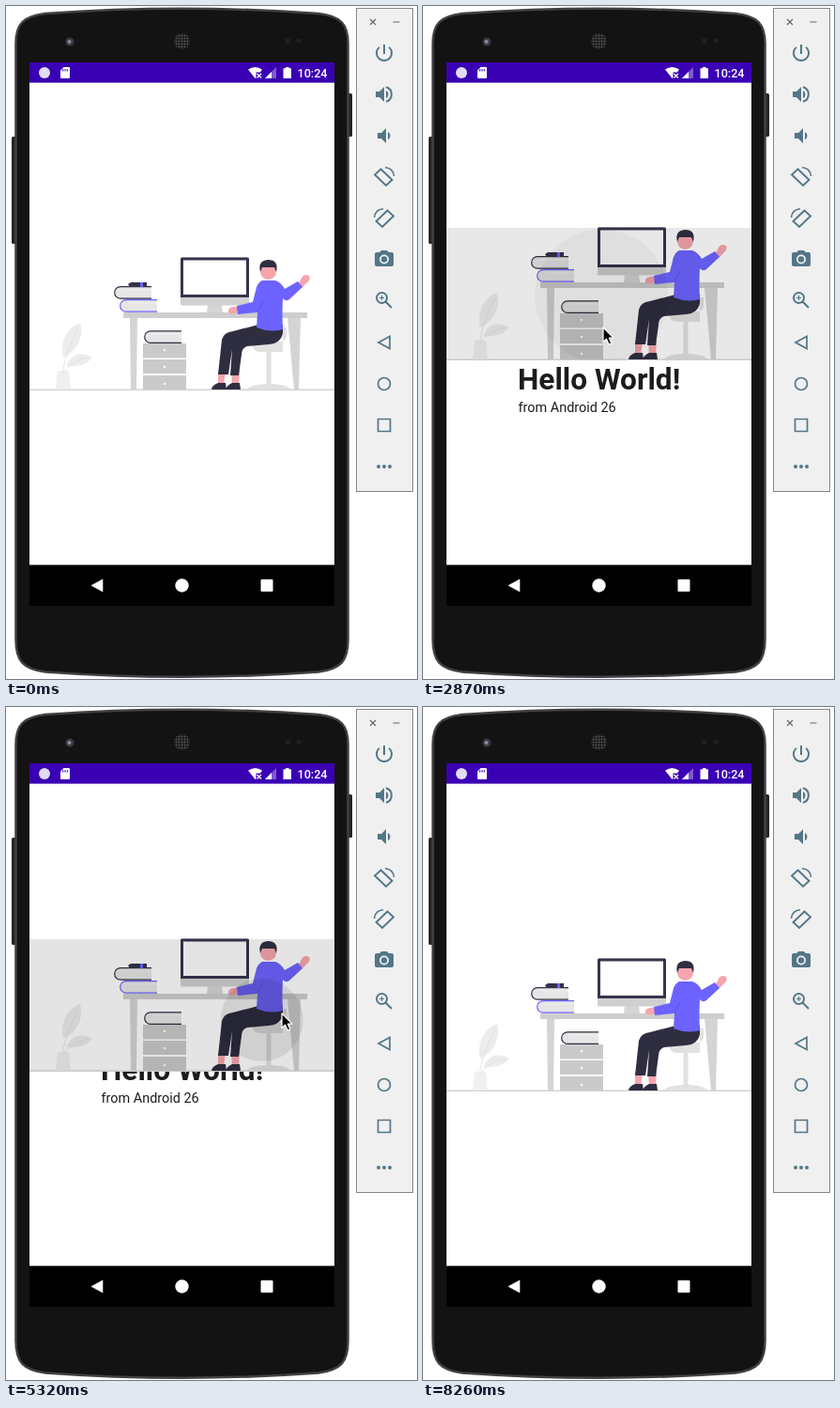
Recreate the animation shown at these times as an HTML page. Size 438 px wide and 716 px high, loop 8.33 s.

```html
<!DOCTYPE html>
<html lang="en">
<head>
<meta charset="utf-8">
<title>Expanding card</title>
<style>
  html, body { margin: 0; width: 100%; height: 100%; overflow: hidden; background: #fff; }
  svg { display: block; width: 438px; height: 716px; }
  text { font-family: Roboto, sans-serif; }
</style>
</head>
<body>
<svg viewBox="0 0 438 716" xmlns="http://www.w3.org/2000/svg">
  <defs>
    <clipPath id="card"><rect x="25" y="268" width="325" height="140.500"/></clipPath>
    <pattern id="mesh" width="3" height="3" patternUnits="userSpaceOnUse">
      <rect width="3" height="3" fill="#191919"/><circle cx="1.5" cy="1.5" r="1" fill="#555"/>
    </pattern>
    <g id="book">
      <path d="M40 .3H7a6.300 6.300 0 0 0 0 12.600H40Z" fill="#e6e6e6"/>
      <path d="M40 .3H7a6.300 6.300 0 0 0 0 12.600H40" fill="none" stroke="currentColor" stroke-width="1.2"/>
      <path d="M9 3.5H40" stroke="#f0f0f0"/>
    </g>
  </defs>

  <!-- phone -->
  <g fill="#252525">
    <rect x="6" y="139" width="6" height="114" rx="1.5"/>
    <rect x="363" y="93" width="6" height="46" rx="1.5"/>
  </g>
  <path d="M10.500 40C10.500 19 18 11 42 8Q188-2.500 333 8C357 11 364.500 19 364.500 40V674C364.500 697 357 705 333 708.500Q188 719 42 708.500C18 705 10.500 697 10.500 674Z" fill="#131313" stroke="#414141" stroke-width="2.500"/>
  <circle cx="68" cy="38" r="4.500" fill="#3a3a42"/>
  <circle cx="67.500" cy="38" r="2" fill="#8c8ca2"/>
  <circle cx="187.500" cy="37.500" r="8.500" fill="url(#mesh)"/>
  <g fill="#202020"><circle cx="300" cy="37" r="3"/><circle cx="312" cy="37" r="2.500"/></g>

  <!-- screen -->
  <rect x="25" y="60" width="325" height="578" fill="#fff"/>
  <rect x="25" y="60" width="325" height="21.600" fill="#3a00b4"/>
  <g fill="#fff">
    <circle cx="41" cy="71" r="6" fill="#e0dcf3"/>
    <path d="M61.500 65H67q1 0 1 1V76q0 1-1 1H59q-1 0-1-1V68.500Z"/>
    <path d="M60.700 67v2.500m2.300-2.500v2.500m2.300-2.500v2.500" stroke="#3a00b4" stroke-width="1"/>
    <path d="M258 67.500Q265.500 62.500 273 67.500L271 70.500H266.500V76.200L265.500 77Z"/>
    <path d="M267.500 72l4.500 4.500m0-4.500l-4.500 4.500" stroke="#fff" stroke-width="1.300"/>
    <path d="M288 65V77H276Z" opacity=".35"/><path d="M283 70V77H276Z"/>
    <path d="M298 65h3.500v1.300h2.500V77h-8.500V66.300H298Z"/>
    <text x="310.500" y="75.700" font-size="12.640" font-weight="500">10:24</text>
  </g>

  <g id="caption" fill="#1c1c1c">
    <text x="101" y="376" font-size="31.600" font-weight="700">Hello World!</text>
    <text x="101.500" y="400" font-size="14.450">from Android 26</text>
  </g>

  <g id="picture">
    <rect x="25" y="267" width="325" height="142" fill="#fff"/>
    <path d="M25 408.200H350" stroke="#bdbdbd"/>
    <!-- plant -->
    <g fill="#ececec">
      <path d="M55 388H67L69 408H53Z" fill="#f0f0f0"/>
      <path d="M61 374C57 358 65 342 79 337C83 352 76 367 61 374Z"/>
      <path d="M64 383C70 370 80 367 92 374C86 382 74 384 64 383Z"/>
      <path d="M61 390Q60 378 77 342M61 390Q70 377 88 374" fill="none" stroke="#dfdfdf" stroke-width=".8"/>
    </g>
    <!-- chair -->
    <g fill="#e1e1e1">
      <path d="M262 357H292Q299 357 299 350V342H295V368H270Q262 368 262 357Z"/>
      <rect x="277.500" y="365" width="5" height="39"/>
      <path d="M257 408C260 400 300 400 303 408Z"/>
    </g>
    <!-- desk and drawers -->
    <g fill="#d4d4d4">
      <path d="M132 331H140L139 408H133Z"/>
      <path d="M300 331H314L312 408H307Z"/>
      <rect x="125" y="326" width="196" height="6" fill="#cecece"/>
    </g>
    <g fill="#cacaca">
      <rect x="146" y="359" width="46" height="15.500"/>
      <rect x="146" y="376" width="46" height="15"/>
      <rect x="146" y="393" width="46" height="15"/>
    </g>
    <g fill="#fff"><circle cx="169" cy="366" r="1.300"/><circle cx="169" cy="384" r="1.300"/><circle cx="169" cy="402" r="1.300"/></g>
    <use href="#book" x="147" y="345.500" color="#2f2e41"/>
    <use href="#book" x="121" y="312.300" color="#6c63ff"/>
    <use href="#book" x="115" y="298.300" color="#2f2e41"/>
    <path d="M130 296l3-2H150V299H132Z" fill="#34324a"/><rect x="143" y="294" width="3" height="5" fill="#6c63ff"/>
    <!-- monitor -->
    <path d="M215 318H230L231 326H214Z" fill="#d5d5d5"/>
    <rect x="186" y="267.500" width="73" height="51" rx="1.500" fill="#d0d0d0"/>
    <path d="M186 310V269q0-1.500 1.500-1.500H257.500q1.500 0 1.500 1.500V310Z" fill="#36344c"/>
    <rect x="189" y="270.500" width="67" height="36.500" fill="#fff"/>
    <!-- person -->
    <g fill="#f6a5ad">
      <path d="M226 388H234L232 404H226Z"/><path d="M240 388H249L248 404H241Z"/>
      <circle cx="279.500" cy="282.500" r="8.500"/>
      <path d="M252 319L242 320Q236 321 237 326Q240 329 247 326L254 325Z"/>
      <path d="M311 297L315 289Q318 284 323 287Q325 291 321 294L315 300Z"/>
    </g>
    <g fill="#2f2e41">
      <path d="M269 339H295V348Q293 359 280 360L257 362Q251 364 251 371L248 393H239L241 365L237 392H226L230 355Q232 347 242 346Z"/>
      <path d="M226 401H234L235 408H219Q219 404 226 401Z"/>
      <path d="M241 401H249L250 408H234Q235 404 241 401Z"/>
      <path d="M271 283Q268 271 279 270Q291 270 288 283L286 278H273Z"/>
    </g>
    <path d="M273 292H287Q293 294 297 301L311 293L316 299L302 312Q298 315 295 311Q294 328 295 344Q281 348 267 342L268 326L247 328L246 319L263 315L267 299Q269 294 273 292Z" fill="#6c63ff"/>
    <path d="M268 325L274 314" stroke="#574fe0" stroke-width=".8"/>
    <g clip-path="url(#card)">
      <rect id="veil" x="25" y="268" width="325" height="140.500"/>
      <circle id="ripple"/>
    </g>
  </g>

  <!-- navigation bar -->
  <rect x="25" y="594.600" width="325" height="43.400"/>
  <g fill="#fff">
    <path d="M91 616.500L103 610V623Z" stroke="#fff" stroke-width=".6" stroke-linejoin="round"/>
    <circle cx="187.500" cy="616.500" r="7.200"/>
    <rect x="271.500" y="610" width="13" height="13" rx="1"/>
  </g>

  <!-- side toolbar -->
  <rect x="373.500" y="2.500" width="60" height="514" fill="#f0f0f0" stroke="#858585"/>
  <path d="M388 14l6 6m0-6l-6 6M412.500 17h7" stroke="#666" stroke-width="1.200"/>
  <g id="tools" fill="#537687"></g>

  <path id="cursor" d="M0 0V15.500L3.500 12.200L6.200 18L8.900 16.800L6.300 11.200H11Z" fill="#000" stroke="#fff" stroke-width="1.200" stroke-linejoin="round"/>
</svg>

<script>
const $ = id => document.getElementById(id);
const clamp = x => Math.max(0, Math.min(1, x));
const smooth = x => (1 - Math.cos(Math.PI * clamp(x))) / 2;
const mix = (a, b, k) => a + (b - a) * k;
const line = (d, width = 2) => `<path d="${d}" fill="none" stroke="#537687" stroke-width="${width}"/>`;

const rotateIcon = line('M8.500 3.500L20.500 15L14 21L2 9.500Z', 1.900) + line('M13 1.800Q21.500 2.500 22.500 11', 1.600);
const tools = [
  [50, '<path d="M13 3h-2v10h2V3zm4.830 2.170l-1.420 1.420C17.990 7.860 19 9.810 19 12c0 3.870-3.130 7-7 7s-7-3.130-7-7c0-2.190 1.010-4.140 2.580-5.420L6.170 5.170C4.230 6.820 3 9.260 3 12c0 4.970 4.030 9 9 9s9-4.030 9-9c0-2.740-1.230-5.180-3.170-6.830z"/>'],
  [94, '<path d="M3 9v6h4l5 5V4L7 9Z"/><path d="M14 8Q16.500 9 16.500 12T14 16Z"/>' + line('M14 4.300A8 8 0 0 1 14 19.700')],
  [138, '<path d="M5 9v6h4l5 5V4L9 9Z"/><path d="M16 8Q18.500 9 18.500 12T16 16Z"/>'],
  [182, rotateIcon],
  [226, `<g transform="matrix(-1 0 0 1 24 0)">${rotateIcon}</g>`],
  [269, '<path d="M9 3L7.200 5H4Q2 5 2 7V18Q2 20 4 20H20Q22 20 22 18V7Q22 5 20 5H16.800L15 3Z"/><circle cx="12" cy="12.500" r="4.100" stroke="#f0f0f0" stroke-width="1.800"/>'],
  [313, line('M15 9.500A5.500 5.500 0 1 1 4 9.500A5.500 5.500 0 1 1 15 9.500M13.500 13.500L20 20') + line('M7 9.500H12M9.500 7V12', 1.200)],
  [358, line('M6 12L18 5.500V18.500Z', 1.700)],
  [402, line('M18.500 12A6.500 6.500 0 1 1 5.500 12A6.500 6.500 0 1 1 18.500 12', 1.700)],
  [446, line('M5.500 5.500H18.500V18.500H5.500Z', 1.700)],
  [490, '<circle cx="6" cy="12" r="2"/><circle cx="12" cy="12" r="2"/><circle cx="18" cy="12" r="2"/>']
];
$('tools').innerHTML = tools.map(([y, icon]) => `<g transform="translate(391 ${y - 12})">${icon}</g>`).join('');

const LOOP = 8330, STEP = 70, SHIFT = 35;

// Pointer stops: time, x, y
const stops = [
  [910, 19, 410], [1680, 165, 344], [2240, 165, 344], [2310, 173, 344], [2450, 192, 342],
  [3360, 192, 342], [3710, 272, 302], [4270, 272, 302], [4480, 282, 309], [5110, 294, 326],
  [5320, 294, 326], [5950, 250, 300], [6160, 185, 552], [6650, 185, 552], [7140, 190, 718]
];

// Taps in card coordinates
const taps = [{ at: 2590, x: 192, y: 342 }, { at: 5180, x: 294, y: 358 }];

function drawCursor(t) {
  const i = stops.findIndex(stop => stop[0] > t);
  $('cursor').style.display = i > 0 ? '' : 'none';
  if (i < 1) return;
  const [t0, x0, y0] = stops[i - 1], [t1, x1, y1] = stops[i];
  const k = smooth((t - t0) / (t1 - t0));
  $('cursor').setAttribute('transform', `translate(${mix(x0, x1, k)} ${mix(y0, y1, k)})`);
}

function drawRipple(t) {
  const tap = taps.find(({ at }) => t >= at && t < at + 770);
  const age = tap ? t - tap.at : 0;
  const fade = 1 - clamp((age - 210) / 500);
  $('veil').setAttribute('opacity', tap ? 0.105 * clamp((age + 20) / 90) * fade : 0);
  const ripple = $('ripple');
  ripple.setAttribute('opacity', tap ? 0.085 * (1 - clamp((age - 140) / 250)) : 0);
  if (!tap) return;
  const k = clamp(age / 700);
  ripple.setAttribute('r', 17 + age * 0.193);
  ripple.setAttribute('cx', mix(tap.x, 187.5, k));
  ripple.setAttribute('cy', mix(tap.y, 338, k));
}

function render(time) {
  const t = Math.floor(time % LOOP / STEP) * STEP;
  const open = smooth((t - 2624) / 300) - smooth((t - 5189) / 300);
  const offset = Math.round(SHIFT * open);
  $('picture').setAttribute('transform', `translate(0 ${-offset})`);
  $('caption').setAttribute('transform', `translate(0 ${offset})`);
  drawRipple(t);
  drawCursor(t);
}

const start = performance.now();
function tick() {
  render(performance.now() - start);
  requestAnimationFrame(tick);
}
tick();
</script>
</body>
</html>
```
